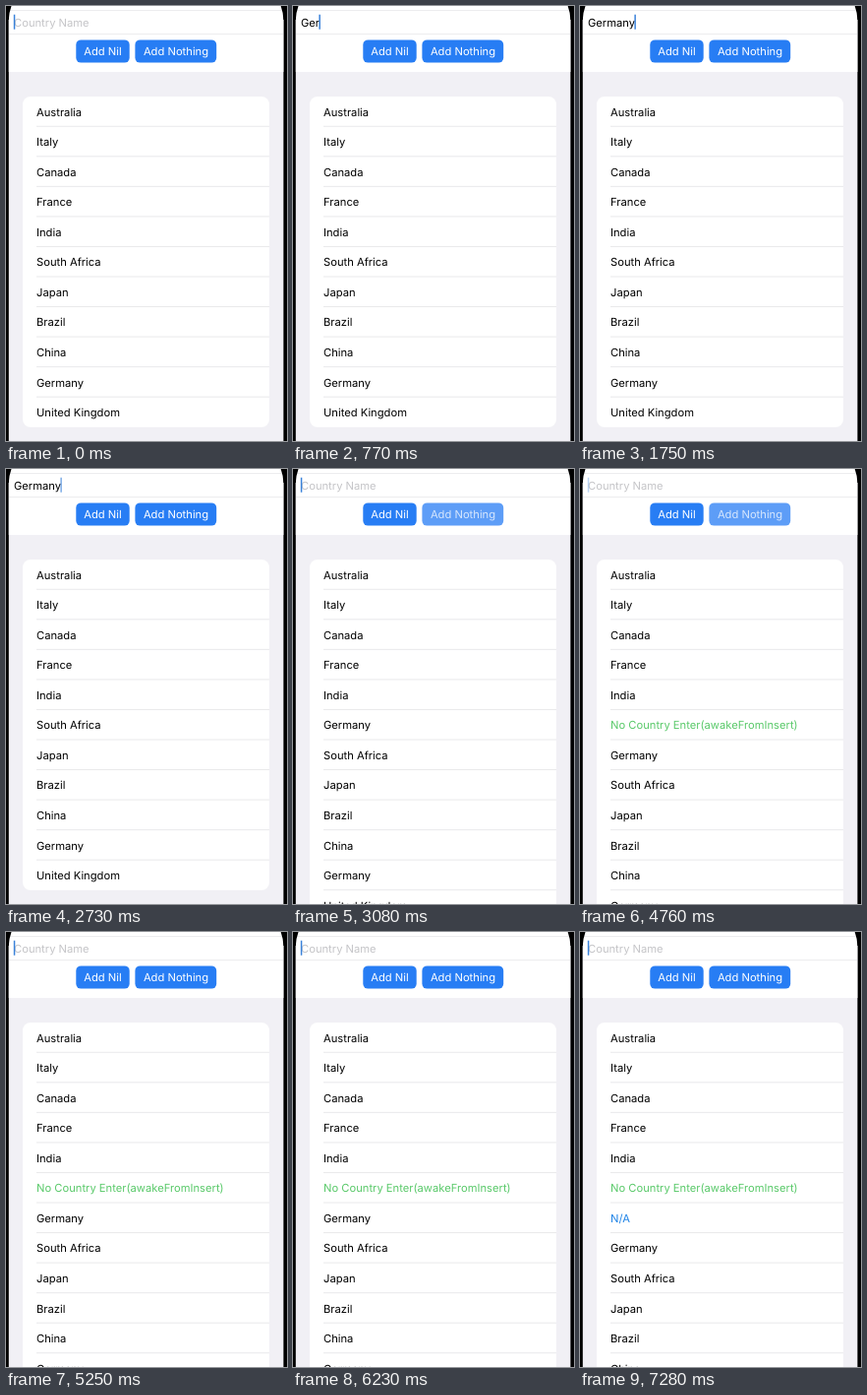
These frames come from a looping animation (286 by 442 pixels, 7350 ms). An HTML page:

```html
<!DOCTYPE html>
<html lang="en">
<head>
<meta charset="utf-8">
<title>Country list</title>
<style>
  html, body { margin: 0; width: 100%; height: 100%; overflow: hidden; background: #000; }
  svg { display: block; width: 100%; height: 100%; }
  text { font: 11.2px Inter, sans-serif; white-space: pre; text-rendering: geometricPrecision; }
</style>
</head>
<body>
<svg viewBox="0 0 286 442">
  <rect x="2.8" width="279.6" height="442" fill="#f1f0f5"/>
  <rect x="2.8" width="279.6" height="67" fill="#fff"/>
  <path d="M3 4.5H282M3 28.5H282" stroke="#ededef"/>
  <path d="M0 0H5.5Q3.2 6 2.8 14H0ZM286 0H279.7Q282 6 282.4 14H286Z"/>
  <text id="field" x="8" y="21"></text>
  <rect id="cursor" y="8.7" width="1.5" height="15" fill="#3a82da"/>
  <g id="addNil">
    <rect x="71.3" y="34.4" width="54.4" height="23.2" rx="5" fill="#277df4"/>
    <text x="98.5" y="50.2" text-anchor="middle" fill="#fff">Add Nil</text>
  </g>
  <g id="addNothing">
    <rect x="131.4" y="34.4" width="82.8" height="23.2" rx="5" fill="#277df4"/>
    <text x="173" y="50.2" text-anchor="middle" fill="#fff">Add Nothing</text>
  </g>
  <rect id="card" x="17" y="92" width="251" rx="8" fill="#fff"/>
  <g id="rows"></g>
</svg>
<script>
const LOOP = 7350, TICK = 70, ROW = 30.55, CARD_TOP = 92, FADE = 420;
const $ = id => document.getElementById(id);

const countries = ['Australia', 'Italy', 'Canada', 'France', 'India', 'South Africa',
  'Japan', 'Brazil', 'China', 'Germany', 'United Kingdom'];

// Each press adds one row at the given index.
const presses = [
  { time: 3080, button: 'addNothing', index: 5, label: 'Germany' },
  { time: 4760, button: 'addNothing', index: 5, label: 'No Country Enter(awakeFromInsert)', color: '#5ac96a' },
  { time: 6370, button: 'addNil', index: 6, label: 'N/A', color: '#1f83e6' }
];

const word = 'Germany';
const keyTimes = [560, 700, 770, 980, 1260, 1400, 1750];

// Cursor fades: first step, last step, final opacity.
const blinks = [
  [280, 350, 0], [560, 560, 1], [2310, 2450, 0], [2660, 2800, 1],
  [3640, 3780, 0], [4060, 4130, 1], [4690, 4830, 0], [5110, 5180, 1],
  [5740, 5880, 0], [6160, 6230, 1], [6790, 6930, 0], [7210, 7280, 1]
];

function cursorOpacity(time) {
  let level = 1;
  for (const [start, end, goal] of blinks) {
    if (time < start) break;
    const part = Math.min(1, (time - start + TICK) / (end - start + TICK));
    level += (goal - level) * part;
  }
  return level;
}

function buttonOpacity(id, time) {
  const press = presses.findLast(p => p.button === id && p.time <= time);
  return press ? Math.min(1, 0.75 + 0.25 * (time - press.time) / FADE) : 1;
}

function add(name, attributes, content = '') {
  const node = document.createElementNS('http://www.w3.org/2000/svg', name);
  for (const key in attributes) node.setAttribute(key, attributes[key]);
  node.textContent = content;
  $('rows').append(node);
}

function drawRows(count) {
  const items = countries.map(label => ({ label }));
  for (const press of presses.slice(0, count)) items.splice(press.index, 0, press);
  $('rows').replaceChildren();
  $('card').setAttribute('height', items.length * ROW);
  items.forEach(({ label, color = '#000' }, i) => {
    const top = CARD_TOP + i * ROW;
    if (i) add('rect', { x: 31, y: top - 0.8, width: 237, height: 1, fill: '#e9e9eb' });
    add('text', { x: 31, y: top + ROW / 2 + 4.3, fill: color }, label);
  });
}

function drawField(typed) {
  const field = $('field');
  field.textContent = typed || 'Country Name';
  field.setAttribute('fill', typed ? '#000' : '#c5c5c8');
  $('cursor').setAttribute('x', typed ? 7.3 + field.getComputedTextLength() : 7.8);
}

let shownCount, shownText;
function frame(now) {
  const time = Math.floor(now % LOOP / TICK) * TICK;
  const count = presses.filter(p => p.time <= time).length;
  const typed = count ? '' : word.slice(0, keyTimes.filter(t => t <= time).length);
  if (count !== shownCount) drawRows(shownCount = count);
  if (typed !== shownText) drawField(shownText = typed);
  $('cursor').setAttribute('opacity', cursorOpacity(time));
  // Fill opacity fades the label and its background separately.
  for (const id of ['addNil', 'addNothing']) $(id).setAttribute('fill-opacity', buttonOpacity(id, time));
  requestAnimationFrame(frame);
}
frame(0);
</script>
</body>
</html>
```
